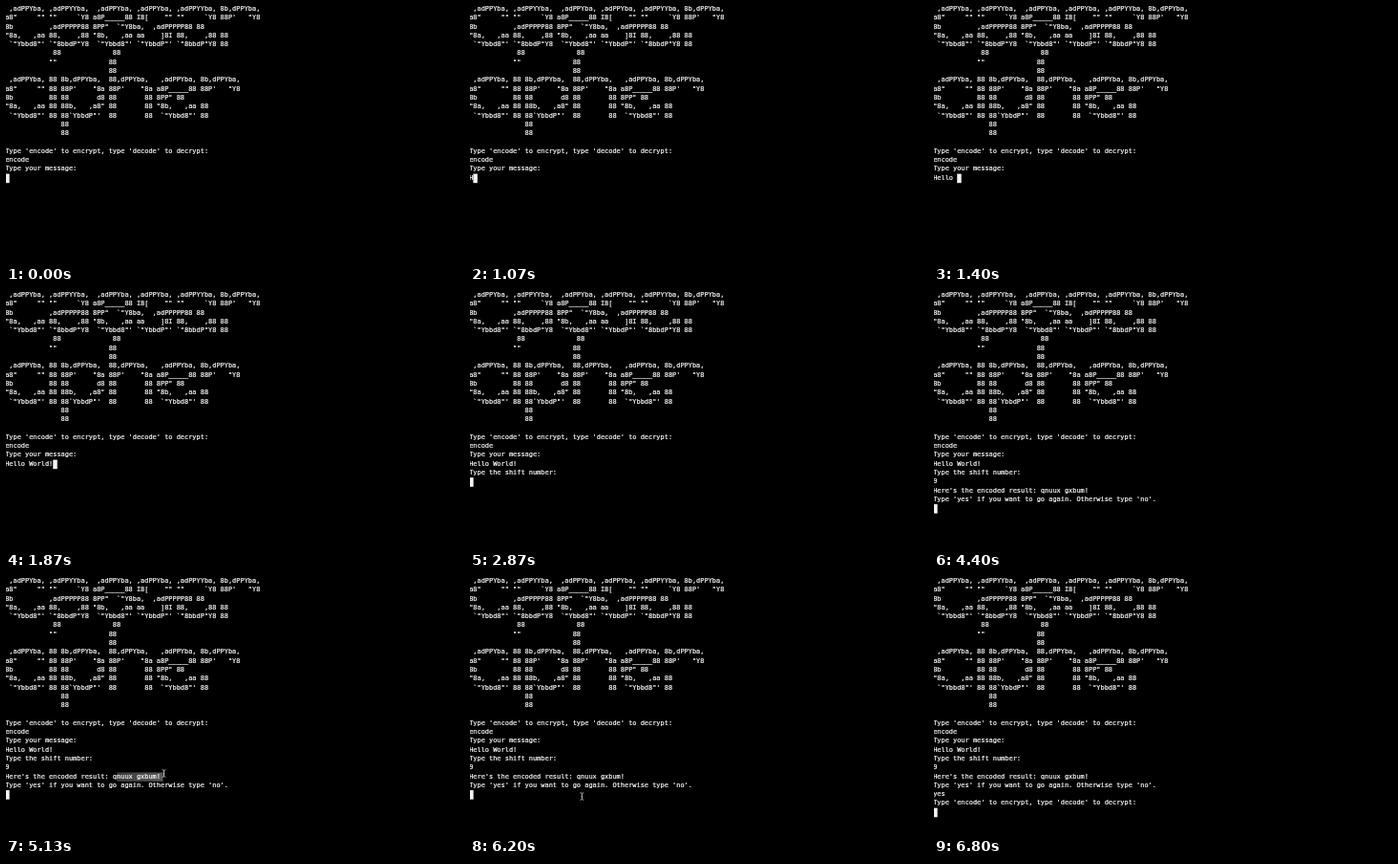
An HTML page with a canvas that plays this animation: 480 by 270 pixels, repeating every 8 s.

```html
<!DOCTYPE html>
<html lang="en">
<head>
<meta charset="utf-8">
<title>Caesar cipher terminal</title>
<style>
html, body { margin: 0; width: 100%; height: 100%; overflow: hidden; background: #000; }
canvas { display: block; width: 480px; height: 270px; }
</style>
</head>
<body>
<canvas id="stage" width="480" height="270"></canvas>
<script>
const ctx = document.getElementById('stage').getContext('2d');
const LOOP = 8000;
const LEFT = -0.85, TOP = -1.1, COL = 4.175, ROW = 9.3, BASELINE = 6;
const ZOOM = 20; // large font drawn small keeps fractional advances
const FONT = `${COL / 0.60205 * ZOOM}px "DejaVu Sans Mono", monospace`;

const banner = String.raw`
 ,adPPYba, ,adPPYYba,  ,adPPYba, ,adPPYba, ,adPPYYba, 8b,dPPYba,
a8"     "" ""     ~Y8 a8P_____88 I8[    "" ""     ~Y8 88P'   "Y8
8b         ,adPPPPP88 8PP"  ~"Y8ba,  ,adPPPPP88 88
"8a,   ,aa 88,    ,88 "8b,   ,aa aa    ]8I 88,    ,88 88
 ~"Ybbd8"' ~"8bbdP"Y8  ~"Ybbd8"' ~"YbbdP"' ~"8bbdP"Y8 88
            88             88
           ""             88
                          88
 ,adPPYba, 88 8b,dPPYba,  88,dPPYba,   ,adPPYba, 8b,dPPYba,
a8"     "" 88 88P'    "8a 88P'    "8a a8P_____88 88P'   "Y8
8b         88 88       d8 88       88 8PP" 88
"8a,   ,aa 88 88b,   ,a8" 88       88 "8b,   ,aa 88
 ~"Ybbd8"' 88 88~YbbdP"'  88       88  ~"Ybbd8"' 88
              88
              88`.slice(1).replace(/~/g, '`').split('\n');

const prompt = "Type 'encode' to encrypt, type 'decode' to decrypt:";
const intro = [...banner, '', prompt, 'encode', 'Type your message:'];
const RESULT_ROW = 22;

const x = col => LEFT + col * COL;
const y = row => TOP + row * ROW;

// Characters of text visible when one key lands per step
function typed(text, t, start, step) {
  const n = t < start ? 0 : Math.floor((t - start) / step) + 1;
  return text.slice(0, n);
}

function linesAt(t) {
  const lines = [...intro];
  const message = t < 1865 ? typed('Hello World', t, 1065, 66.7) : 'Hello World!';
  lines.push(message);
  if (t >= 2870) lines.push('Type the shift number:', t >= 3600 ? '9' : '');
  if (t >= 4400) {
    lines.push("Here's the encoded result: qnuux gxbum!",
      "Type 'yes' if you want to go again. Otherwise type 'no'.",
      typed('yes', t, 6530, 67));
  }
  if (t >= 6800) lines.push(prompt, '');
  return lines;
}

// A thin stroke gives the heavier look of smoothed terminal text
function drawText(lines) {
  ctx.save();
  ctx.scale(1 / ZOOM, 1 / ZOOM);
  ctx.font = FONT;
  ctx.fillStyle = ctx.strokeStyle = '#f2f2f2';
  ctx.lineWidth = 0.25 * ZOOM;
  ctx.lineJoin = 'round';
  lines.forEach((line, row) => {
    const at = [LEFT * ZOOM, (y(row) + BASELINE) * ZOOM];
    ctx.fillText(line, ...at);
    ctx.strokeText(line, ...at);
  });
  ctx.restore();
}

function drawCaret(lines) {
  const row = lines.length - 1;
  ctx.fillStyle = '#f4f4f4';
  ctx.fillRect(x(lines[row].length), y(row), COL + 0.3, ROW + 0.3);
}

function drawSelection() {
  const from = x(28), to = x(39) + 2.5;
  const shade = ctx.createLinearGradient(from, 0, to, 0);
  shade.addColorStop(0, '#3c3c3c');
  shade.addColorStop(1, '#5a5a5a');
  ctx.fillStyle = shade;
  ctx.fillRect(from, y(RESULT_ROW), to - from, ROW);
}

function drawPointer(px, py) {
  ctx.fillStyle = '#c0c0c0';
  ctx.fillRect(px - 0.5, py - 3.5, 1, 7);
  ctx.fillRect(px - 0.9, py - 0.1, 1.8, 0.8);
  for (const side of [-1, 1]) {
    ctx.fillRect(px - 2, py + side * 3.6 - 0.4, 1.6, 0.8);
    ctx.fillRect(px + 0.4, py + side * 3.6 - 0.4, 1.6, 0.8);
  }
}

function pointerAt(t) {
  if (t < 5330) return [165.5, 204.5];
  const step = t < 5930 ? 0 : Math.min(4, Math.floor((t - 5930) / 90) + 1);
  const k = step / 4;
  return [166.5 - 49.2 * k, 204.5 + 24 * k];
}

function draw(t) {
  ctx.fillStyle = '#000';
  ctx.fillRect(0, 0, 480, 270);
  const lines = linesAt(t);
  if (t >= 5130 && t < 6200) drawSelection();
  drawText(lines);
  drawCaret(lines);
  if (t >= 5130 && t < 6530) drawPointer(...pointerAt(t));
}

const begin = performance.now();
function tick() {
  draw((performance.now() - begin) % LOOP);
  requestAnimationFrame(tick);
}
tick();
</script>
</body>
</html>
```
